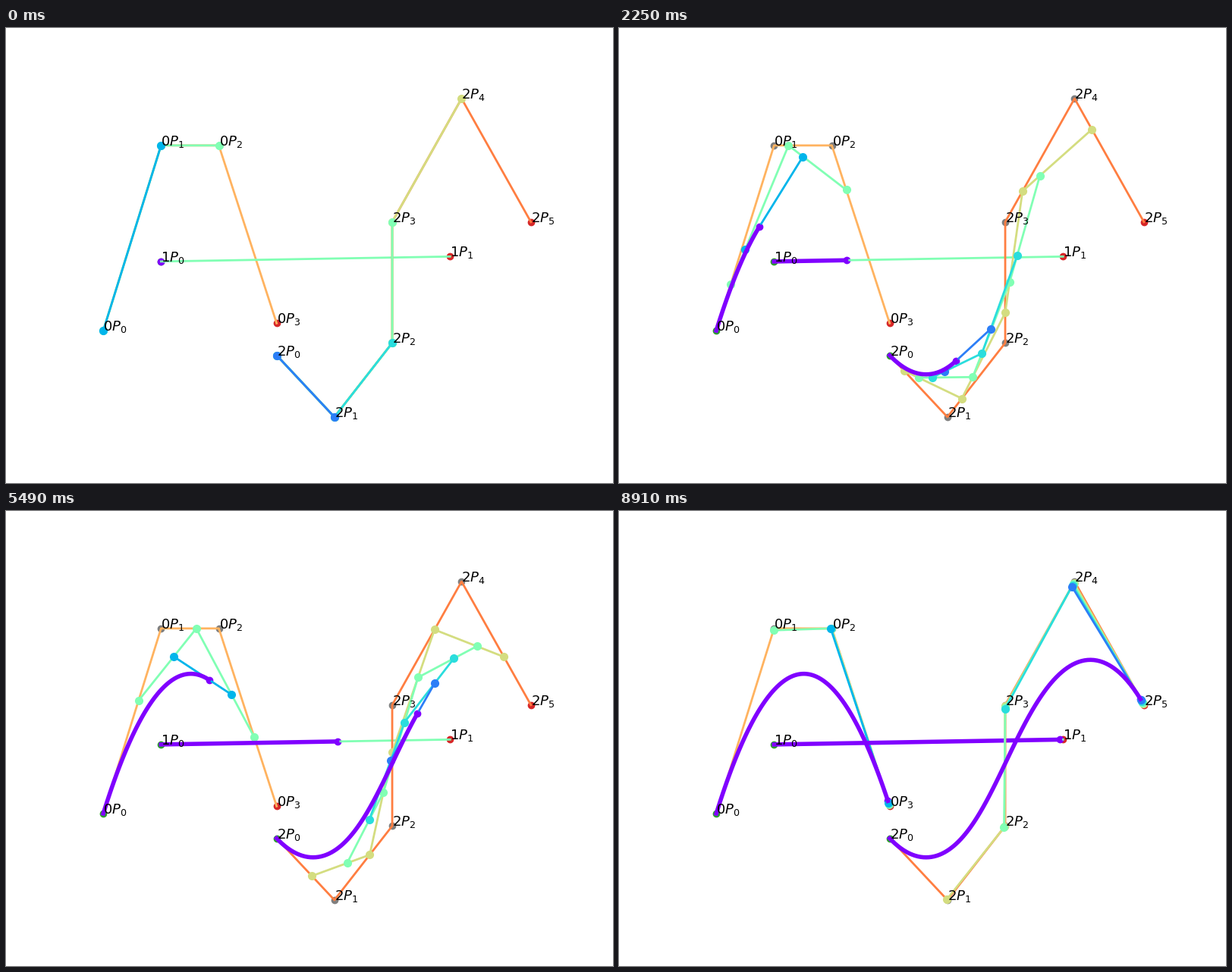
A matplotlib script for the animation above (9000 ms loop, 800x600 px).

```python
import matplotlib.pyplot as plt
import numpy as np
from matplotlib.animation import FuncAnimation

STEPS = 100
INTERVAL = 90

CONTROL_POINTS = [
    [(0, 3.5), (1, 11), (2, 11), (3, 3.8)],
    [(1, 6.3), (6, 6.5)],
    [(3, 2.5), (4, 0), (5, 3), (5, 7.9), (6.2, 12.9), (7.4, 7.9)],
]


def casteljau_levels(points, t):
    """Return every polygon of the construction, ending with a single point."""
    levels = [points]
    while len(levels[-1]) > 1:
        last = levels[-1]
        levels.append((1 - t) * last[:-1] + t * last[1:])
    return levels


class BezierArtist:
    def __init__(self, ax, index, points):
        self.points = np.array(points, dtype=float)
        count = len(self.points)
        self.path = np.array([casteljau_levels(self.points, k / STEPS)[-1][0]
                              for k in range(STEPS)])

        colors = ["tab:green"] + ["tab:gray"] * (count - 2) + ["tab:red"]
        for k, ((x, y), color) in enumerate(zip(self.points, colors)):
            ax.scatter(x, y, color=color)
            ax.text(x, y, f"${index}P_{k}$", fontsize=13)

        self.polygons = []
        for size in range(count, 1, -1):
            marker = "" if size == count else "o"
            line, = ax.plot([], [], color=plt.cm.rainbow((size - 1) / count),
                            lw=2, marker=marker, markersize=7)
            self.polygons.append(line)

        violet = plt.cm.rainbow(0.0)
        self.tip = ax.scatter(*self.path[0], color=[violet])
        self.curve, = ax.plot([], [], color=violet, lw=4)

    def update(self, step):
        levels = casteljau_levels(self.points, step / STEPS)
        for line, level in zip(self.polygons, levels):
            line.set_data(level[:, 0], level[:, 1])
        self.tip.set_offsets(levels[-1])
        self.curve.set_data(*self.path[:step + 1].T)
        return [*self.polygons, self.tip, self.curve]


fig, ax = plt.subplots(figsize=(8, 6), dpi=100)
ax.set_xlim(-0.37, 7.77)
ax.set_ylim(-0.645, 13.545)
ax.axis("off")

beziers = [BezierArtist(ax, i, pts) for i, pts in enumerate(CONTROL_POINTS)]


def update(step):
    return [artist for bezier in beziers for artist in bezier.update(step)]


anim = FuncAnimation(fig, update, frames=STEPS, interval=INTERVAL,
                     repeat=True, repeat_delay=0)
plt.show()
```
